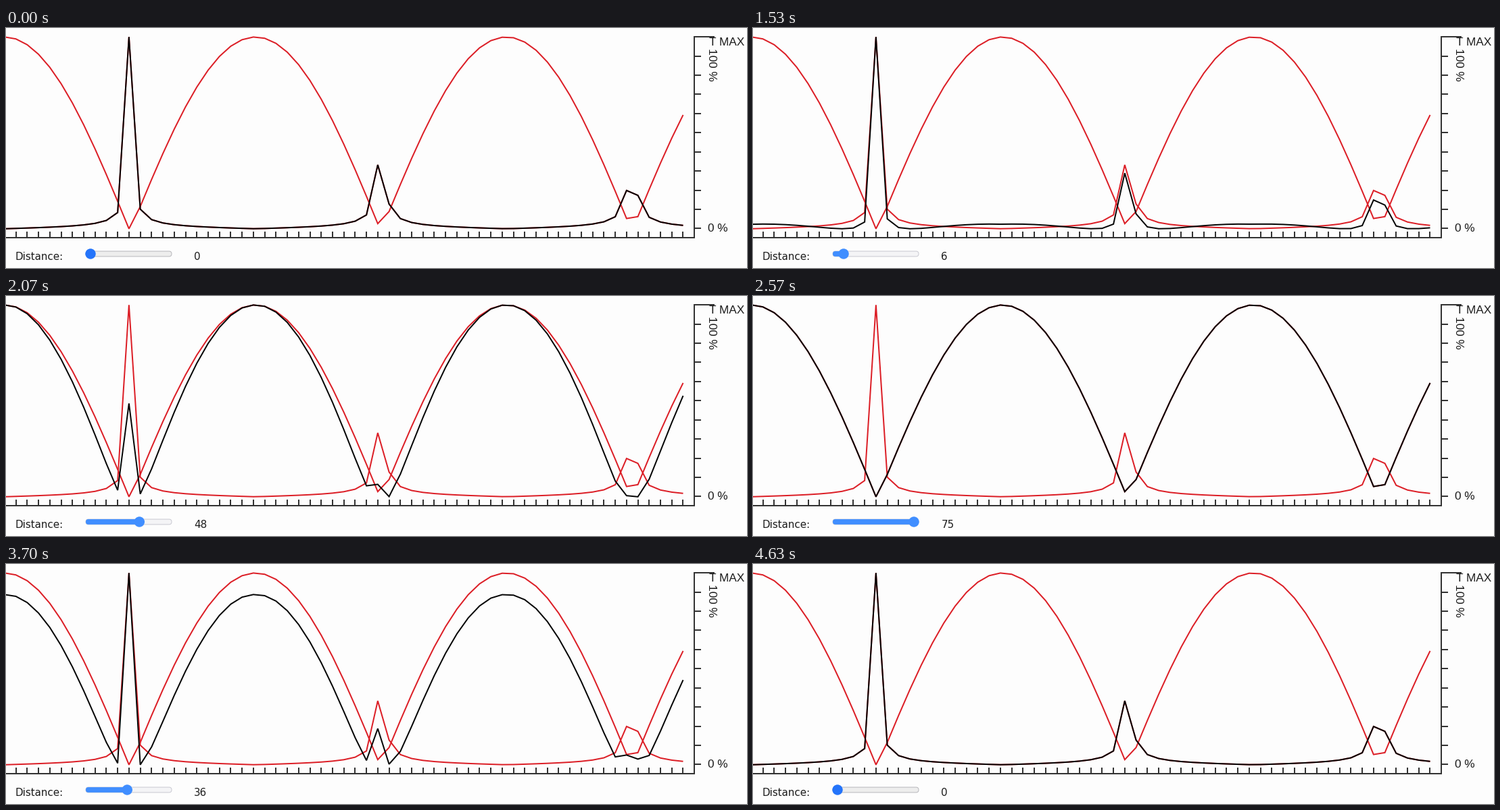
Animation, 1096 px wide and 356 px high, one loop 5870 ms. Source, as a matplotlib script:

```python
import numpy as np
import matplotlib.pyplot as plt
from matplotlib.animation import FuncAnimation
from matplotlib.patches import Circle, FancyBboxPatch

W, H, DPI = 1096, 356, 64
PT = 72 / DPI                      # points per pixel
LOOP, STEP = 5870, 10              # ms

PAPER, INK, AXIS = "#fdfdfd", "#1c1c1c", "#333333"
RED, BLACK = "#dc1e26", "#050505"
TOP, BASE, FLOOR, RIGHT = 13.3, 297.8, 311, 1018

# slider looks: (blue, empty track, track border)
IDLE = ("#2474fa", "#ededed", "#b8b8bc")
HOVER = ("#1f62d2", "#e5e5e5", "#b0b0b4")
ACTIVE = ("#408eff", "#f4f4f6", "#cacad2")

# dragged distance over time
TIMES = [1270, 1530, 2070, 2370, 2565, 3000, 3130, 3700, 4130, 4300]
DIST = [0, 6, 48, 74, 75, 75, 65, 36, 3, 0]

# standing wave |cos| and the matching |tan|, coarsely sampled
k = np.arange(61)
x = 14.6 + 16.727 * (k - 1)
wave = np.abs(np.cos(0.1416 * k))
peaks = np.abs(np.tan(0.1416 * k))
peaks /= peaks.max()


def to_y(v):
    v = (v - v.min()) / (v.max() - v.min())
    return BASE - v * (BASE - TOP)


def distance(t):
    return int(round(np.interp(t, TIMES, DIST)))


def slider_look(t):
    if 300 <= t < 650:
        return HOVER
    return ACTIVE if 650 <= t < 4630 else IDLE


def knob_x(d):
    return 125 + d * 113 / 75


fig = plt.figure(figsize=(W / DPI, H / DPI), dpi=DPI, facecolor=PAPER)
ax = fig.add_axes([0, 0, 1, 1])
ax.set(xlim=(0, W), ylim=(H, 0))
ax.axis("off")


def curve(ys, color, z):
    return ax.plot(x, ys, color=color, lw=2 * PT, zorder=z,
                   solid_joinstyle="miter", solid_capstyle="butt")[0]


def segments(x0, y0, x1, y1):
    """Draw many separate strokes as one line."""
    x0, y0, x1, y1 = np.broadcast_arrays(x0, y0, x1, y1)
    gap = np.full(x0.shape, np.nan)
    ax.plot(np.c_[x0, x1, gap].ravel(), np.c_[y0, y1, gap].ravel(),
            color=AXIS, lw=2 * PT, solid_capstyle="butt")


def label(px, py, s, size, font, **kw):
    return ax.text(px, py, s, fontsize=size * PT, family=font,
                   color=INK, va="baseline", **kw)


def bar(px, width, z, **kw):
    r = 3.9
    box = FancyBboxPatch((px, 335 - r), width, 2 * r, zorder=z,
                         boxstyle=f"round,pad=0,rounding_size={r}", **kw)
    return ax.add_patch(box)


# axes
ax.plot([0, RIGHT, RIGHT, RIGHT + 30], [FLOOR, FLOOR, TOP, TOP], color=AXIS,
        lw=2 * PT, solid_joinstyle="miter", solid_capstyle="butt")
marks = np.linspace(TOP, 297.3, 11)[1:]
segments(x[1:], 302, x[1:], FLOOR)
segments(RIGHT, marks, RIGHT + 10, marks)
label(1039.5, 26, "T MAX", 17.3, "Liberation Sans")
label(1037.5, 302, "0 %", 17.3, "Liberation Sans")
label(1036, 30, "100 %", 17.3, "Liberation Sans", rotation=270).set_va("top")

# curves
curve(to_y(wave), RED, 3)
curve(to_y(peaks), RED, 3)
mix = curve(to_y(peaks), BLACK, 4)

# slider
label(13.6, 344, "Distance:", 15.1, "DejaVu Sans")
value = label(278.3, 344, "0", 15.1, "DejaVu Sans")
track = bar(118, 127, 2, lw=PT)
fill = bar(118, 8, 3, lw=0)
knob = ax.add_patch(Circle((125, 335), 7.7, lw=0, zorder=4))


def draw(i):
    t = i * STEP
    d = distance(t)
    share = d / 75
    mix.set_ydata(to_y((1 - share) * peaks + share * wave))
    value.set_text(str(d))
    blue, empty, edge = slider_look(t)
    cx = knob_x(d)
    track.set(facecolor=empty, edgecolor=edge)
    fill.set(facecolor=blue, width=cx - 118 + (7 if d == 75 else 1))
    knob.set(facecolor=blue, center=(cx, 335))
    return mix, value, track, fill, knob


anim = FuncAnimation(fig, draw, frames=LOOP // STEP, interval=STEP,
                     repeat=True, repeat_delay=0)
plt.show()
```
